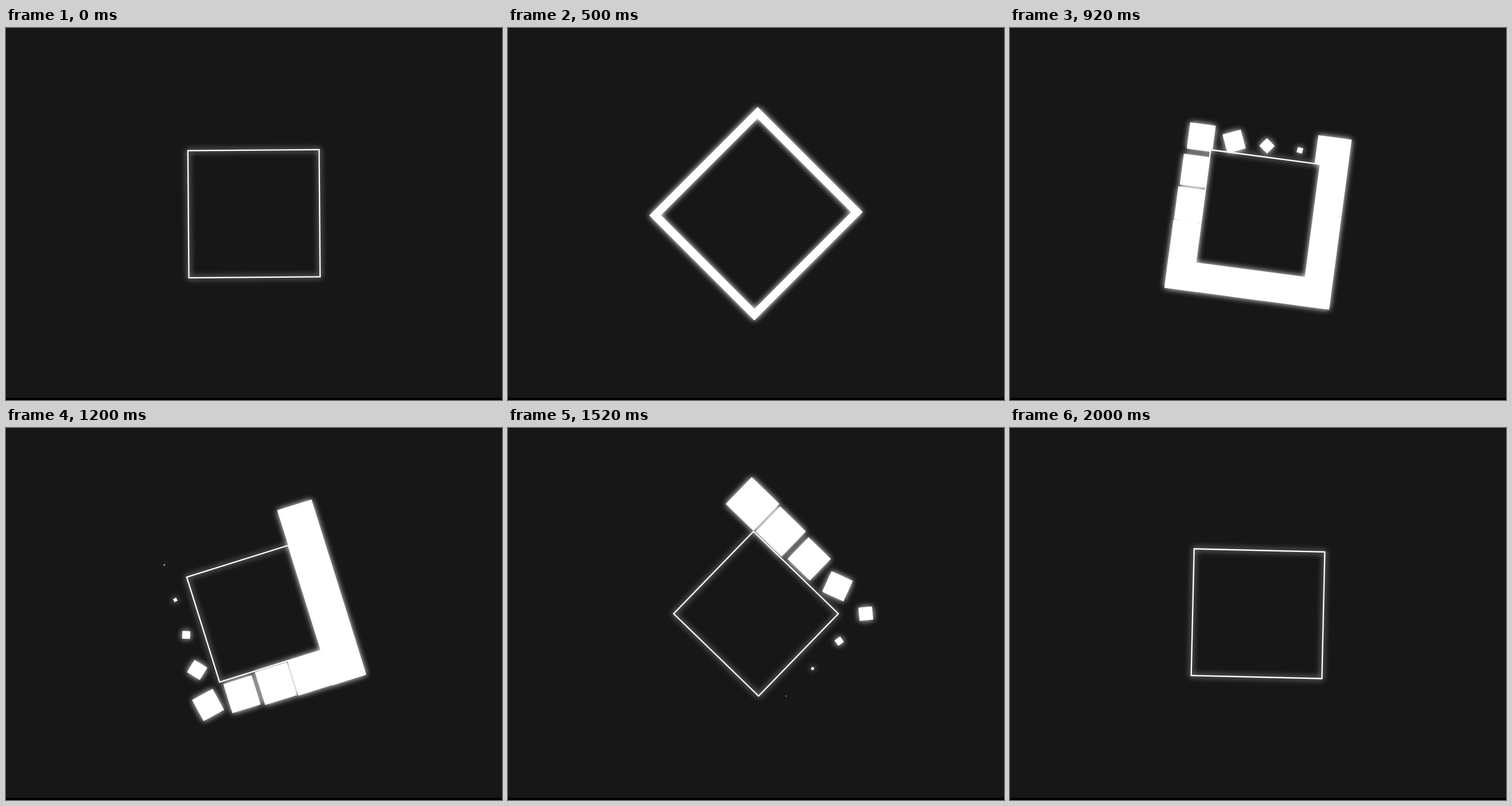
An HTML page with a canvas that plays this animation: 864 px wide and 648 px high, repeating every 2020 ms.

```html
<!DOCTYPE html>
<html lang="en">
<head>
<meta charset="utf-8">
<title>Square loop</title>
<style>
  html, body { margin: 0; width: 100%; height: 100%; overflow: hidden; background: #171717; }
  canvas { display: block; }
</style>
</head>
<body>
<canvas id="stage" width="864" height="648"></canvas>
<script>
const LOOP = 2020, STEP = 20;
const CX = 432, CY = 323.5;
const BASE_W = 228.6, BASE_H = 221.6;
const SHRINK = LOOP / 3, STAGGER = LOOP * 0.03, FIRST_END = 1150;

const stage = document.getElementById('stage');
const ctx = stage.getContext('2d');
const layer = document.createElement('canvas');
layer.width = stage.width;
layer.height = stage.height;
const pen = layer.getContext('2d');

const clamp = x => Math.min(1, Math.max(0, x));
const cubicInOut = x => x < 0.5 ? 4 * x ** 3 : 1 - 4 * (1 - x) ** 3;

// Ring of 16 cells in a 5x5 grid, from above the bottom right corner, counter-clockwise
const ring = Array.from({ length: 16 }, (_, k) => {
  const n = k % 4 - 1;
  return [[2, -n], [-n, -2], [-2, n], [n, 2]][Math.floor(k / 4)];
});

function drawCell([col, row], k, t, w, h) {
  const left = clamp((FIRST_END + STAGGER * k - t) / SHRINK);
  const size = cubicInOut(left);
  if (size < 0.006) return;
  const turn = -330 * Math.max(0, 0.59 - left);
  const cw = (w + 0.7) * size, ch = (h + 0.7) * size;
  pen.save();
  pen.translate(col * w, row * h);
  pen.rotate(turn * Math.PI / 180);
  pen.fillRect(-cw / 2, -ch / 2, cw, ch);
  pen.restore();
}

function drawShape(t) {
  const zoom = 1 + t / LOOP * 2 / 3;
  const hole = 1 - 0.4 * clamp(t / (LOOP / 2)) ** 2;
  const w = BASE_W * zoom, h = BASE_H * zoom;
  const hw = w * hole, hh = h * hole;

  pen.setTransform(1, 0, 0, 1, 0, 0);
  pen.clearRect(0, 0, layer.width, layer.height);
  pen.translate(CX, CY);
  pen.rotate((-0.45 - 180 * t / LOOP) * Math.PI / 180);
  pen.fillStyle = pen.strokeStyle = '#fff';
  ring.forEach((cell, k) => drawCell(cell, k, t, w / 5, h / 5));
  pen.clearRect(-hw / 2, -hh / 2, hw, hh);
  pen.lineWidth = 2.3;
  pen.strokeRect(-hw / 2, -hh / 2, hw, hh);
}

function render(t) {
  drawShape(t);
  ctx.shadowColor = 'transparent';
  ctx.fillStyle = '#171717';
  ctx.fillRect(0, 0, 864, 648);
  ctx.fillStyle = '#050005';
  ctx.fillRect(0, 644, 864, 4);
  ctx.shadowColor = '#fff';
  ctx.shadowBlur = 11;
  ctx.drawImage(layer, 0, 0);
}

const start = performance.now();
function tick() {
  const t = (performance.now() - start) % LOOP;
  render(Math.floor(t / STEP) * STEP);
  requestAnimationFrame(tick);
}
tick();
</script>
</body>
</html>
```
